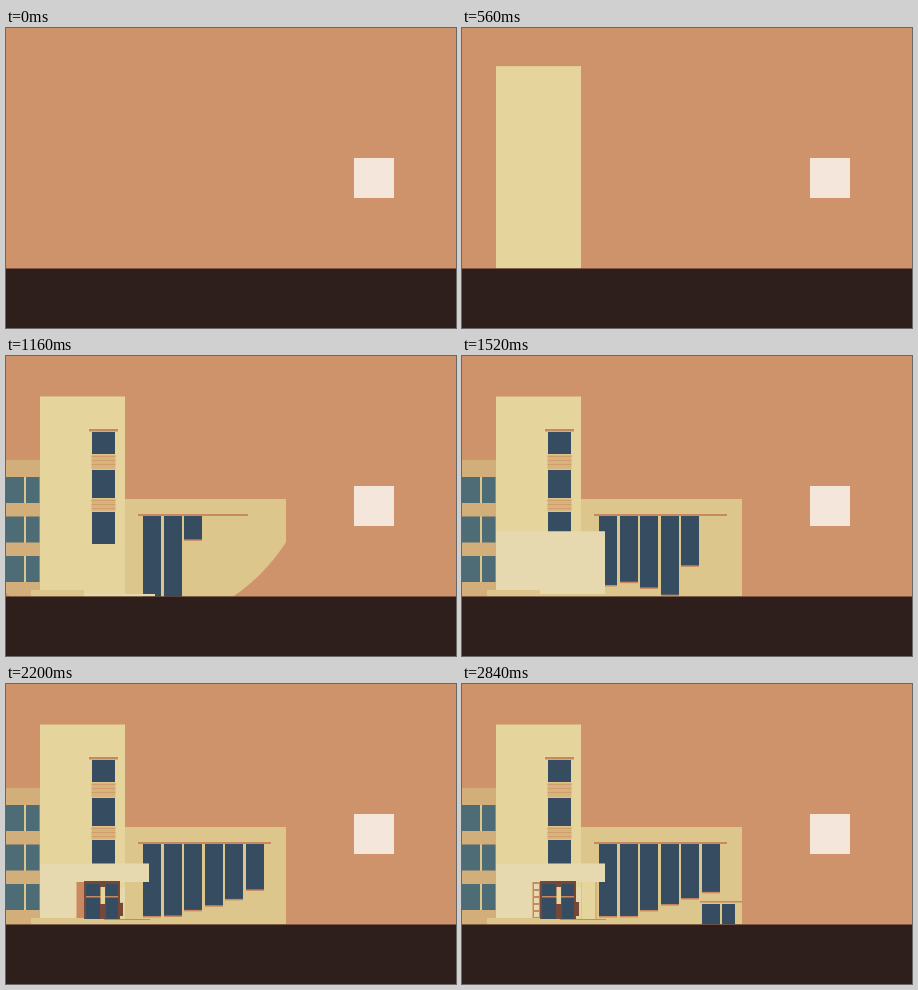
Write an HTML page with a canvas that moves like this. It is 450x300 px and loops after 3600 ms.

```html
<!DOCTYPE html>
<html lang="en">
<head>
<meta charset="utf-8">
<title>Building</title>
<style>
html, body { margin: 0; width: 100%; height: 100%; overflow: hidden; background: #cf936b; }
canvas { display: block; width: 450px; height: 300px; }
</style>
</head>
<body>
<canvas id="stage" width="450" height="300"></canvas>
<script>
const LOOP = 3600, STEP = 40;
const GROUND = 240.5;
const C = {
  sky: '#cf936b', ground: '#2f1f1c', tower: '#e5d49b', wing: '#dcc68c',
  side: '#d2ae7b', pale: '#e7d9af', glass: '#364d61', teal: '#4e6c76',
  trim: '#c98960', band: '#d9b37c', frame: '#75483a', badge: '#f4e6da'
};
const ctx = document.getElementById('stage').getContext('2d');

// Progress from 0 to 1, slowing down at the end.
function ease(t, start, length) {
  const p = Math.min(1, Math.max(0, (t - start) / length));
  return 1 - (1 - p) ** 2;
}

// Progress from 0 that swings past 1 and settles there.
function spring(t, start, decay = 7.5, period = 0.8) {
  const s = Math.max(0, t - start) / 1000;
  return 1 - Math.exp(-decay * s) * Math.cos(2 * Math.PI * s / period);
}

// Fill a box given by its edges.
function box(color, left, top, right, bottom) {
  if (right <= left || bottom <= top) return;
  ctx.fillStyle = color;
  ctx.fillRect(left, top, right - left, bottom - top);
}

// A box that grows upwards to its full height.
function rise(color, left, top, right, bottom, p) {
  box(color, left, bottom - (bottom - top) * p, right, bottom);
}

function inCircle(x, y, r, draw) {
  ctx.save();
  ctx.beginPath();
  ctx.arc(x, y, Math.max(0, r), 0, Math.PI * 2);
  ctx.clip();
  draw();
  ctx.restore();
}

function leftWing(t) {
  inCircle(96, 100, 62 + 114 * ease(t, 580, 800), () => {
    box(C.side, 0, 104, 34, GROUND);
    for (let i = 0; i < 3; i++) {
      const y = 121 + i * 39.5;
      box(C.wing, 18, y, 20, y + 26);
      box(C.teal, 0, y, 18, y + 26);
      box(C.teal, 20, y, 33.5, y + 26);
    }
  });
}

function rightWing(t) {
  inCircle(119, 82, (t - 546) * 0.3125, () => box(C.wing, 119, 143, 280, GROUND));
}

function stairWindows(t) {
  for (let i = 0; i < 6; i++) {
    const x = 137 + Math.round(i * 20.5);
    const full = Math.min(72, 78 - i * 6);
    const height = full * spring(t, 820 + i * 140, 4, 0.62);
    if (height < 1) continue;
    box(C.trim, x, 160, x + 18, 161.5 + height);
    box(C.glass, x, 160, x + 18, 160 + height);
  }
  box(C.trim, 132, 158, 132 + 133 * ease(t, 880, 480), 160);
}

function sideDoors(t) {
  box(C.trim, 238, 217, 238 + 42 * ease(t, 2260, 240), 218.5);
  rise(C.glass, 240, 220, 258, GROUND, ease(t, 2400, 300));
  rise(C.glass, 260, 220, 273, GROUND, ease(t, 2480, 300));
}

function tower(t) {
  rise(C.tower, 34, 40.5, 119, GROUND, spring(t, 40));
}

function spacer(top, bottom, half) {
  box(C.band, 97.5 - half, top, 97.5 + half, bottom);
  for (let y = top + 2; y < bottom - 1; y += 4) {
    box(C.trim, 97.5 - half, y, 97.5 + half, y + 0.5);
  }
}

function towerWindows(t) {
  const sill = 14.5 * ease(t, 560, 120);
  box(C.trim, 97.5 - sill, 73, 97.5 + sill, 75.5);
  const tops = [76, 114, 156], heights = [22, 28, 32];
  tops.forEach((top, i) => {
    const start = 580 + i * 140, bottom = top + heights[i];
    box(C.glass, 86, top, 109, top + heights[i] * ease(t, start, 120));
    if (i < 2) spacer(bottom + 0.5, tops[i + 1] - 0.5, 12 * ease(t, start + 80, 160));
  });
}

function door(t) {
  rise(C.trim, 70.5, 198, 78, 236, ease(t, 1800, 200));
  rise(C.frame, 78, 197, 114, 237, ease(t, 1840, 180));
  const glass = ease(t, 1920, 200);
  rise(C.glass, 80, 200, 94, 237, glass);
  rise(C.glass, 100, 200, 112, 237, glass);
  if (t > 2080) box(C.trim, 80, 212, 112, 213.5);
  rise(C.tower, 94.5, 203, 99, 220, ease(t, 2080, 120));

  const side = ease(t, 2080, 160);
  rise(C.frame, 114, 218, 117, 232, side);
  rise(C.pale, 114, 203, 119, 218, side);
  rise(C.tower, 120, 198, 133, 236, ease(t, 2240, 200));
  rise(C.band, 133, 198, 135, 236, ease(t, 2300, 200));

  // Glass blocks beside the door.
  for (let i = 0; i < 5; i++) {
    const y = 200 + i * 7;
    const size = 5 * ease(t, 2240 + i * 120, 120);
    box(C.pale, 74.5 - size / 2, y, 74.5 + size / 2, y + size);
  }
}

function entrance(t) {
  const top = GROUND - 61 * spring(t, 1180);
  const open = GROUND - 42.5 * ease(t, 1700, 200);
  box(C.pale, 34, top, 143, open);
  box(C.pale, 34, open, 70.5, GROUND);
  door(t);
}

function steps(t) {
  const right = 78 + 71 * ease(t, 640, 200) + 9 * ease(t, 2240, 240);
  const top = 238 - 3 * ease(t, 1720, 280);
  box(t < 1200 ? C.pale : C.wing, 78, top, right, GROUND);
  box(C.trim, 98, 235, 98 + 46 * ease(t, 2000, 160), 236);
  box(C.wing, 25, 234, 25 + 53 * ease(t, 600, 200), GROUND);
}

function draw(t) {
  box(C.sky, 0, 0, 450, 300);
  if (t >= 600) leftWing(t);
  rightWing(t);
  stairWindows(t);
  sideDoors(t);
  tower(t);
  towerWindows(t);
  entrance(t);
  steps(t);
  box(C.sky, 0, 240, 450, GROUND);
  box(C.ground, 0, GROUND, 450, 300);
  box(C.badge, 348, 130, 388, 170);
}

const start = performance.now();
function frame() {
  const t = (performance.now() - start) % LOOP;
  draw(Math.floor(t / STEP) * STEP);
  requestAnimationFrame(frame);
}
frame();
</script>
</body>
</html>
```
